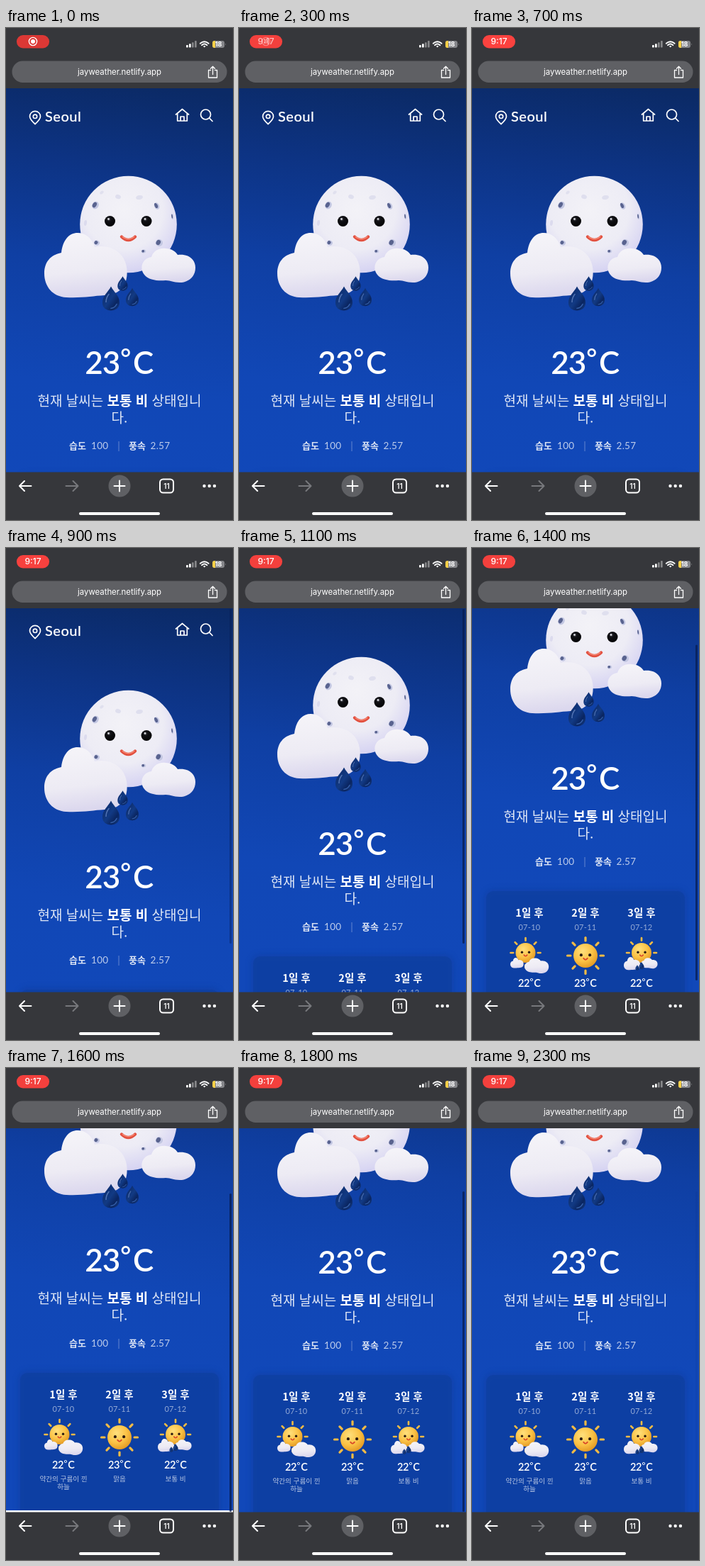
Write an HTML page that moves like this. It is 320 px wide and 694 px high and loops after 2400 ms.

```html
<!DOCTYPE html>
<html lang="ko">
<head>
<meta charset="utf-8">
<title>Weather</title>
<style>
html, body { margin: 0; width: 100%; height: 100%; overflow: hidden; background: #36373b; }
svg { display: block; width: 320px; height: 694px; }
text { fill: #fff; }
.ui { font-family: Inter, Roboto, sans-serif; }
.lat { font-family: Lato, "Open Sans", sans-serif; }
.kr { font-family: "Noto Sans CJK KR", "Noto Sans CJK", "Noto Sans KR", sans-serif; }
.mid { text-anchor: middle; }
.line { fill: none; stroke: #fff; stroke-linecap: round; stroke-linejoin: round; }
</style>
</head>
<body>
<svg viewBox="0 0 320 694">
  <defs>
    <linearGradient id="sky" gradientUnits="userSpaceOnUse" x1="190" y1="80" x2="120" y2="650">
      <stop offset="0" stop-color="#0b2a66"/>
      <stop offset=".2" stop-color="#0d3383"/>
      <stop offset=".45" stop-color="#0f3fa3"/>
      <stop offset=".75" stop-color="#1147b6"/>
      <stop offset="1" stop-color="#1148b9"/>
    </linearGradient>
    <radialGradient id="moon" cx=".45" cy=".35" r=".68">
      <stop offset="0" stop-color="#f3f2f7"/>
      <stop offset=".6" stop-color="#edecf5"/>
      <stop offset="1" stop-color="#d3d0f2"/>
    </radialGradient>
    <linearGradient id="cloud" x1="0" y1="0" x2=".15" y2="1">
      <stop offset="0" stop-color="#f6f5f9"/>
      <stop offset=".65" stop-color="#edebf4"/>
      <stop offset="1" stop-color="#dcd8ee"/>
    </linearGradient>
    <linearGradient id="drop" x1="0" y1="0" x2="1" y2="1">
      <stop offset="0" stop-color="#0b2763"/>
      <stop offset=".5" stop-color="#123a84"/>
      <stop offset=".75" stop-color="#0a2560"/>
      <stop offset="1" stop-color="#16408c"/>
    </linearGradient>
    <radialGradient id="sun" cx=".38" cy=".32" r=".75">
      <stop offset="0" stop-color="#ffdf7c"/>
      <stop offset=".55" stop-color="#fbc245"/>
      <stop offset="1" stop-color="#e0941f"/>
    </radialGradient>
    <radialGradient id="eye" cx=".4" cy=".32" r=".6">
      <stop offset="0" stop-color="#4a4a50"/>
      <stop offset=".35" stop-color="#101014"/>
      <stop offset="1" stop-color="#050507"/>
    </radialGradient>
    <filter id="soft" x="-10%" y="-10%" width="120%" height="120%"><feGaussianBlur stdDeviation="4"/></filter>
    <clipPath id="view"><rect y="85" width="320" height="542"/></clipPath>
    <path id="puff" d="M31 91C12 90 0 76 0 57C0 41 9 31 24 28C26 10 35 0 47 0C58 0 67 7 71 20C86 17 100 21 109 32C117 42 119 58 114 71C109 82 98 88 85 88C68 89 54 92 31 91Z"/>
    <path id="bean" d="M4 38C-3 30 0 15 14 13C17 4 25 0 34 1C42 1 48 5 51 10C64 8 76 15 76 28C76 41 66 49 54 49C44 49 42 46 34 46C24 47 10 46 4 38Z"/>
    <path id="tear" d="M0 -17C4 -9 12 -4 12 6C12 13 7 17 0 17C-7 17 -12 13 -12 6C-12 -4 -4 -9 0 -17Z"/>
  </defs>

  <g clip-path="url(#view)">
    <rect y="85" width="320" height="542" fill="#fff"/>
    <g id="page"></g>
    <rect id="thumb" x="315" width="3" rx="1.5" fill="#071c50" fill-opacity=".75"/>
  </g>

  <rect width="320" height="85" fill="#36373b"/>
  <rect id="pill" x="15" y="10" width="46" height="18.4" rx="9"/>
  <g id="rec">
    <circle class="line" cx="38" cy="19" r="5.6" stroke-width="1.4"/>
    <circle cx="38" cy="19" r="3" fill="#fff"/>
  </g>
  <text id="clock" class="ui mid" x="38" y="23.2" font-size="12" font-weight="500">9:17</text>
  <g fill="#fff">
    <rect x="254" y="24" width="2.7" height="3.5" rx=".7"/>
    <rect x="258" y="22.3" width="2.7" height="5.2" rx=".7"/>
    <rect x="262" y="20.2" width="2.7" height="7.3" rx=".7" opacity=".4"/>
    <rect x="266" y="18" width="2.7" height="9.5" rx=".7" opacity=".4"/>
  </g>
  <g class="line" stroke-width="1.9">
    <path d="M273.8 21.8Q279.7 16.6 285.6 21.8M276 24.2Q279.7 20.8 283.4 24.2"/>
    <path d="M279.7 27.6L277.9 25.7Q279.7 24.2 281.5 25.7Z" fill="#fff" stroke="none"/>
  </g>
  <rect x="291" y="18" width="17" height="10" rx="3" fill="#85868a"/>
  <path d="M295 18H294a3 3 0 0 0-3 3v4a3 3 0 0 0 3 3h1Z" fill="#f7cf46"/>
  <path d="M309 21.3q1.6 1.7 0 3.4Z" fill="#85868a"/>
  <text class="ui mid" x="299.5" y="26.3" font-size="9" font-weight="700">18</text>

  <rect x="8.5" y="46.5" width="303" height="30.5" rx="15.2" fill="#5f6064"/>
  <text class="ui mid" x="160" y="65.5" font-size="11.4">jayweather.netlify.app</text>
  <path class="line" stroke-width="1.3" d="M288.5 59.5H285.5V70H297.5V59.5H294.5M291.5 65.5V54.5M288.5 57.3L291.5 54.3L294.5 57.3"/>

  <rect y="626.5" width="320" height="67.5" fill="#36373b"/>
  <path class="line" stroke-width="2" d="M35.5 646H19M26 639L19 646L26 653"/>
  <path class="line" stroke-width="2" style="stroke:#77787c" d="M84.5 646H101.5M94.5 639L101.5 646L94.5 653"/>
  <circle cx="160" cy="646" r="15.5" fill="#5f6064"/>
  <path class="line" stroke-width="2" d="M152.5 646H167.5M160 638.5V653.5"/>
  <rect class="line" x="217" y="636.5" width="19" height="19" rx="4.5" stroke-width="2"/>
  <text class="ui mid" x="226.5" y="649.7" font-size="10" font-weight="600">11</text>
  <g fill="#fff"><circle cx="279.5" cy="646" r="2.2"/><circle cx="286.7" cy="646" r="2.2"/><circle cx="293.9" cy="646" r="2.2"/></g>
  <rect x="103" y="683" width="114" height="4" rx="2" fill="#fff"/>
</svg>
<script>
const LOOP = 2400, STEP = 100, PAGE_END = 825;
const $ = id => document.getElementById(id);

const text = (cls, x, y, size, weight, str, extra = '') =>
  `<text class="${cls}" x="${x}" y="${y}" font-size="${size}" font-weight="${weight}" ${extra}>${str}</text>`;
const ellipse = (x, y, rx, ry, fill, turn = 0) =>
  `<ellipse cx="${x}" cy="${y}" rx="${rx}" ry="${ry}" fill="${fill}" transform="rotate(${turn} ${x} ${y})"/>`;
const cloud = (shape, x, y, k) =>
  `<use href="#${shape}" fill="url(#cloud)" transform="translate(${x} ${y}) scale(${k})"/>`;
const drop = (x, y, k) =>
  `<g transform="translate(${x} ${y}) scale(${k})"><use href="#tear" fill="url(#drop)"/>
   <path d="M-7 5Q-7 -1 -3 -6" fill="none" stroke="#7c9bd6" stroke-width="1.6" stroke-linecap="round" opacity=".6"/>
   <path d="M8 8Q6 13 0 14" fill="none" stroke="#4f80d0" stroke-width="1.6" stroke-linecap="round" opacity=".6"/></g>`;
const crater = (x, y, rx, ry, turn) =>
  ellipse(x, y, rx, ry, '#c3c7e2', turn) + ellipse(x - rx * .25, y - ry * .1, rx * .6, ry * .75, '#59638f', turn);

// A degree ring set apart from its neighbours.
const degrees = (n, x, y, size) =>
  text('lat', x - size * 1.11, y, size, 600, n, `letter-spacing="${-size * .02}"`) +
  text('lat mid', x + size * .2, y - size * .2, size * .82, 600, '°') +
  text('lat', x + size * .43, y, size, 600, 'C');

function sun(x, y, r) {
  let rays = '';
  for (let i = 0; i < 8; i++) {
    rays += `<path d="M0 ${-r * 1.24}V${-r * 1.5}" transform="rotate(${i * 45})"/>`;
  }
  return `<g transform="translate(${x} ${y})">
    <g stroke="#f3bb45" stroke-width="${r * .19}" stroke-linecap="round">${rays}</g>
    <circle r="${r}" fill="url(#sun)"/>
    <circle cx="${-r * .36}" cy="${-r * .05}" r="${r * .12}" fill="#2b1a10"/>
    <circle cx="${r * .36}" cy="${-r * .05}" r="${r * .12}" fill="#2b1a10"/>
    <path d="M${-r * .16} ${r * .22}Q0 ${r * .46} ${r * .16} ${r * .22}" fill="none" stroke="#d9472b" stroke-width="${r * .12}" stroke-linecap="round"/>
  </g>`;
}

const header = `
  <g class="line" stroke-width="1.7">
    <path d="M41 135.5C36.5 131.5 33.5 128.5 33.5 124.8A7.5 7.5 0 0 1 48.5 124.8C48.5 128.5 45.5 131.5 41 135.5Z"/>
    <circle cx="41" cy="124.8" r="2.7"/>
    <path d="M239.5 122L248.5 114.5L257.5 122M241.7 120.5V131H255.3V120.5M246 131V125H251V131"/>
    <circle cx="281.5" cy="122" r="7"/><path d="M286.7 127.2L291 131.5"/>
  </g>` + text('lat', 55, 132, 20, 500, 'Seoul', 'letter-spacing=".5" stroke="#fff" stroke-width=".2"');

const hero = `
  <circle cx="172.5" cy="277" r="68.3" fill="url(#moon)"/>
  ${crater(126, 250, 4.5, 5.5, 30)}${crater(212.5, 251, 3.5, 5, -25)}
  ${crater(216, 303, 5, 5, 30)}${crater(194, 315, 3.2, 2.4, -15)}
  ${crater(128, 303, 4, 3.5, 30)}${crater(234.5, 266, 1.5, 4, -8)}
  ${ellipse(158, 238, 4, 3, '#dfdfee', 20)}${ellipse(188, 239, 5, 3, '#dfdfee', -10)}
  ${ellipse(135, 232, 3, 2, '#e0e0ee', -40)}${ellipse(112, 275, 2, 4, '#dcdbee', 8)}
  <circle cx="146.5" cy="272.5" r="7.5" fill="url(#eye)"/>
  <circle cx="198" cy="272.5" r="7.5" fill="url(#eye)"/>
  <circle cx="144.5" cy="269.5" r="1.4" fill="#d8d8de"/><circle cx="196" cy="269.5" r="1.4" fill="#d8d8de"/>
  <path d="M163 294.5Q172.5 303.5 182 294.5" fill="none" stroke="#e2503f" stroke-width="4.4" stroke-linecap="round"/>
  <path d="M164 294.3Q172.5 301.5 181 294.3" fill="none" stroke="#f58a76" stroke-width="1.2" stroke-linecap="round"/>
  ${cloud('puff', 54, 289, 1)}${cloud('bean', 191, 310, 1)}
  ${drop(148, 381.5, 1)}${drop(164.5, 360.5, .6)}${drop(178, 379.5, .75)}`;

const summary =
  degrees('23', 160, 488, 44) +
  text('kr mid', 160, 533, 19, 300, '현재 날씨는 <tspan font-weight="700" fill-opacity="1">보통 비</tspan> 상태입니', 'fill-opacity=".87"') +
  text('kr mid', 160, 557, 19, 300, '다.', 'fill-opacity=".87"') +
  `<g opacity=".85">` +
  text('kr', 89, 594, 13, 700, '습도') +
  text('lat', 120, 594, 13.5, 400, '100', 'letter-spacing=".3" opacity=".85"') +
  text('kr', 173, 594, 13, 700, '풍속') +
  text('lat', 203.5, 594, 13.5, 400, '2.57', 'letter-spacing=".3" opacity=".85"') +
  `</g><path d="M159 583V597" stroke="#fff" stroke-opacity=".35"/>`;

const icons = [
  sun(75.5, 718, 14) + cloud('puff', 54, 725, .16) + cloud('bean', 74, 725, .45),
  sun(160, 722, 17),
  sun(239, 718, 14) + cloud('puff', 214, 724, .2) + cloud('bean', 238, 725, .31) + drop(233, 739, .22) + drop(239, 736, .3)
];
const days = [
  ['07-10', '22', ['약간의 구름이 낀', '하늘']],
  ['07-11', '23', ['맑음']],
  ['07-12', '22', ['보통 비']]
];
const forecast = `
  <rect x="17" y="628" width="286" height="220" rx="14" fill="#0b3088" opacity=".28" filter="url(#soft)"/>
  <rect x="20" y="631" width="280" height="220" rx="10" fill="#0e3fa0" opacity=".7"/>` +
  days.map(([date, temp, words], i) => {
    const x = 81 + 79 * i;
    return text('kr mid', x, 666.5, 14.5, 700, `${i + 1}일 후`) +
      text('lat mid', x, 685.5, 11, 400, date, 'letter-spacing=".3" opacity=".55"') +
      icons[i] +
      degrees(temp, x, 765.5, 14.5) +
      words.map((w, n) => text('kr mid', x, 783.5 + 11.5 * n, 9.6, 300, w, 'opacity=".7"')).join('');
  }).join('');

$('page').innerHTML = `<rect y="60" width="320" height="${PAGE_END - 60}" fill="url(#sky)"/>` +
  header + hero + summary + forecast +
  `<rect y="${PAGE_END}" width="320" height="60" fill="#fff"/>`;

// Tracks of [time, value], linear between points.
const tracks = {
  scroll: [[700, 0], [800, 1], [900, 8], [1000, 28], [1100, 55], [1300, 107], [1400, 147], [1500, 183], [1600, 201], [1700, 200], [1800, 198]],
  top: [[1100, 86], [1300, 110], [1500, 163], [1600, 177], [1800, 174]],
  bottom: [[1100, 558], [1300, 595], [1500, 625], [1600, 626]],
  bar: [[800, 0], [1000, 1], [1900, 1], [2200, .08]],
  clock: [[100, 0], [400, 1]],
  glow: [[0, 0], [400, 1], [700, 1], [1100, .75]]
};
function at(track, t) {
  const i = track.findIndex(p => p[0] >= t);
  if (i < 0) return track[track.length - 1][1];
  if (i === 0) return track[0][1];
  const [a, u] = track[i - 1], [b, v] = track[i];
  return u + (v - u) * (t - a) / (b - a);
}

function draw(now) {
  const t = Math.floor(now % LOOP / STEP) * STEP;
  const v = name => at(tracks[name], t);
  const glow = v('glow');
  $('page').setAttribute('transform', `translate(0 ${-v('scroll')})`);
  $('thumb').setAttribute('y', v('top'));
  $('thumb').setAttribute('height', v('bottom') - v('top'));
  $('thumb').setAttribute('opacity', v('bar'));
  $('clock').setAttribute('opacity', v('clock'));
  $('rec').setAttribute('opacity', 1 - v('clock'));
  $('pill').setAttribute('fill', `rgb(${220 + 31 * glow}, ${56 + 10 * glow}, ${53 + 10 * glow})`);
}

const start = performance.now();
function tick() {
  draw(performance.now() - start);
  requestAnimationFrame(tick);
}
draw(0);
tick();
</script>
</body>
</html>
```
